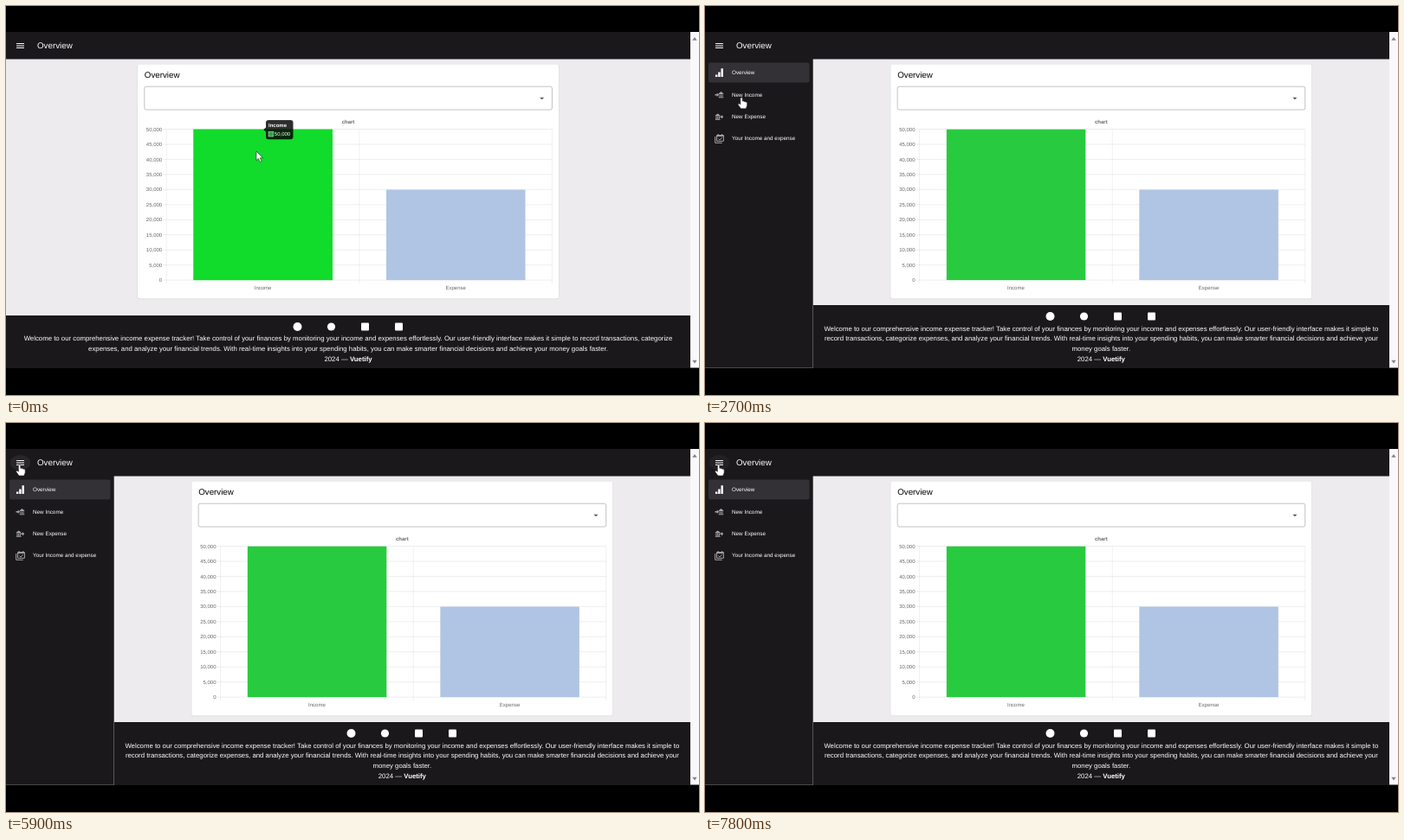
An HTML page for the animation above (8 s loop, 800x450 px).

```html
<!DOCTYPE html>
<html lang="en">
<head>
<meta charset="utf-8">
<title>Overview</title>
<style>
html, body { margin: 0; width: 100%; height: 100%; overflow: hidden; background: #000; }
body { font-family: "Liberation Sans", Arial, sans-serif; text-rendering: geometricPrecision; }
#stage { position: absolute; left: 0; top: 0; width: 800px; height: 450px; overflow: hidden; }
#stage > svg { position: absolute; left: 0; top: 0; }
footer {
  position: absolute; right: 10px; bottom: 31.5px; box-sizing: border-box;
  padding: 21.1px 7.8px 4.1px; background: #1a181b; color: #fff;
  font-size: 7.81px; line-height: 11.72px; text-align: center;
}
footer svg { position: absolute; left: 50%; top: 5.5px; margin-left: -70px; }
.heading { font-size: 9.77px; }
.chart { font-size: 6px; fill: #666; }
.nav { font-size: 6.34px; fill: #fff; }
</style>
</head>
<body>
<div id="stage">
<svg width="800" height="450" viewBox="0 0 800 450">
  <rect y="30" width="790" height="388.5" fill="#edebee"/>

  <g id="card">
    <rect x="151.5" y="67.8" width="487" height="271.4" rx="2.5" fill="#d9d7da"/>
    <rect x="152" y="67.8" width="486" height="270.6" rx="2" fill="#fff"/>
    <text class="heading" x="159.8" y="83.3">Overview</text>
    <rect x="159.8" y="93.2" width="470.6" height="26.8" rx="2" fill="none" stroke="#aaa9ab" stroke-width=".7"/>
    <path d="M616.1 105.7h5l-2.5 2.5z" fill="#555"/>
    <g class="chart">
      <text x="395" y="136.1" text-anchor="middle" font-weight="bold">chart</text>
      <g id="grid"></g>
      <rect x="216.5" y="142.7" width="160.5" height="174.4" fill="#28cb3f"/>
      <rect id="barHover" x="216.5" y="142.7" width="160.5" height="174.4" fill="#11db2b"/>
      <rect x="439" y="212.5" width="160.5" height="104.6" fill="#b0c4e4"/>
      <text x="296.6" y="327.7" text-anchor="middle">Income</text>
      <text x="519.2" y="327.7" text-anchor="middle">Expense</text>
      <g id="tooltip" fill="#fff">
        <path d="M303 132h25.500a3 3 0 0 1 3 3v16.200a3 3 0 0 1-3 3h-25.500a3 3 0 0 1-3-3v-5.700l-2.800-2.500 2.800-2.500v-5.500a3 3 0 0 1 3-3z" fill="#000" fill-opacity=".82"/>
        <text x="303" y="139.800" font-weight="bold">Income</text>
        <rect x="303" y="145.200" width="5.800" height="5.800" fill="#28a93f" stroke="#dfe8df" stroke-width=".5"/>
        <text x="309.800" y="150">50,000</text>
      </g>
    </g>
  </g>

  <g id="drawer">
    <rect y="61" width="124.700" height="357.500" fill="#1a181b"/>
    <rect x="4" y="65.400" width="116.500" height="23.200" rx="2" fill="#333135"/>
    <path d="M12 79.600h2.400v2.400H12zM15.200 76.400h2.400V82h-2.400zM18.500 72.200h2.400V82h-2.400z" fill="#fff"/>
    <g fill="#a5a4a6">
      <path d="M11.500 102.100h2.300v-1.500l2.300 2.200-2.300 2.200v-1.500h-2.300z"/>
      <use href="#bank" x="15.700" y="99"/>
      <use href="#bank" x="11.900" y="124.400"/>
      <path d="M17.300 127.500h1.700V126l2.300 2.200-2.300 2.200v-1.500h-1.700z"/>
    </g>
    <path d="M13.600 149.500h7.800v6.800h-7.800zM13.600 150.600h7.800M15.200 148v1.500M19.700 148v1.500M11.700 151v7.300h8M15.500 153.600l1.500 1.400 2.700-2.700" fill="none" stroke="#a5a4a6" stroke-width="1"/>
    <g id="links" class="nav"></g>
  </g>

  <rect y="30" width="790" height="31.500" fill="#1a181b"/>
  <ellipse id="ripple" cx="16.500" cy="45.900" rx="11.700" ry="8.800" fill="#fff"/>
  <path d="M12 43.500h9M12 46h9M12 48.400h9" stroke="#fff" stroke-width="1"/>
  <text class="heading" x="36" y="48.600" fill="#fff">Overview</text>

  <rect x="790" y="30" width="10" height="388.500" fill="#f9f8fb"/>
  <path d="M792.300 39.700h5.400l-2.700-3.700zM792.300 409.800h5.400l-2.700 3.700z" fill="#85848a"/>

  <g id="cursor" fill="#fff" stroke="#222" stroke-width=".6" stroke-linejoin="round">
    <path id="arrow" d="M0 0V10.600l2.400-2.200 1.800 4 1.900-.9-1.800-3.800h3.300z"/>
    <path id="hand" d="M-1.200 1Q0-.9 1.200 1V4.400Q2.500 3.600 3.200 4.900 4.400 4.300 5 5.400 6.600 5 6.600 6.800V9.300L5.200 13H-.6L-3.800 8.500Q-4 6.800-2.500 7.200L-1.200 8.300z"/>
  </g>

  <defs>
    <path id="bank" d="M0 2.200 2.800 0 5.600 2.200V3H0zM.6 3.500h1v2.300h-1zM2.300 3.500h1v2.300h-1zM4 3.500h1v2.300H4zM0 6.200h5.600v1.100H0z"/>
  </defs>
</svg>

<footer id="footer">
  <svg width="140" height="14" fill="#fff">
    <circle cx="11.500" cy="7" r="5"/>
    <circle cx="50.500" cy="7" r="4.600"/>
    <rect x="85" y="2.500" width="9" height="9" rx="1"/>
    <rect x="124" y="2.500" width="9" height="9" rx="1"/>
  </svg>
  Welcome to our comprehensive income expense tracker! Take control of your finances by monitoring your income and expenses effortlessly. Our user-friendly interface makes it simple to record transactions, categorize expenses, and analyze your financial trends. With real-time insights into your spending habits, you can make smarter financial decisions and achieve your money goals faster.
  <div>2024 — <b>Vuetify</b></div>
</footer>
</div>

<script>
const LOOP = 8000, DRAWER_WIDTH = 124.7, SLIDE = 200;
const el = id => document.getElementById(id);
const clamp = v => Math.min(1, Math.max(0, v));

// Keyframes: time followed by one or more values, joined linearly.
const cursorPath = [
  [100, 289, 168], [900, 66, 77], [1250, 20.5, 48.5], [2250, 20.5, 48.5],
  [2500, 30, 76], [3000, 60, 150], [3400, 240, 100], [3800, 348, 58],
  [4200, 250, 50], [4600, 120, 100], [5000, 75, 198], [5250, 70, 190],
  [5750, 15.6, 48]
];
const rippleAlpha = [
  [1150, 0], [1300, .06], [1600, .06], [1700, .24], [1900, .16], [2200, .05], [2400, 0],
  [5650, 0], [5800, .06], [5900, .06], [6050, .24], [6300, .13], [6600, .05],
  [6800, .06], [6900, .24], [7200, .13], [7600, .04]
];
const barHighlight = [[350, 1], [550, .35], [900, 0]];
const tooltipAlpha = [[350, 1], [650, 0]];
const toggles = [[1720, 1], [5950, -1], [6850, 1]];

function track(keys, t) {
  const next = keys.findIndex(k => k[0] > t);
  if (next === 0) return keys[0].slice(1);
  if (next < 0) return keys[keys.length - 1].slice(1);
  const a = keys[next - 1], b = keys[next], p = (t - a[0]) / (b[0] - a[0]);
  return a.slice(1).map((v, i) => v + (b[i + 1] - v) * p);
}

// cubic-bezier(.4, 0, .2, 1)
function ease(x) {
  let low = 0, high = 1;
  for (let i = 0; i < 20; i++) {
    const s = (low + high) / 2;
    const at = 1.2 * s * (1 - s) ** 2 + .6 * s * s * (1 - s) + s ** 3;
    if (at < x) low = s; else high = s;
  }
  return low * low * (3 - 2 * low);
}

function buildStatic() {
  let grid = "";
  for (let i = 0; i <= 10; i++) {
    const y = 142.5 + i * 17.46;
    const label = ((10 - i) * 5000).toLocaleString("en-US");
    grid += `<path d="M181.2 ${y}H630.5" stroke="#000" stroke-opacity=".1" stroke-width=".7"/>
      <text x="180.2" y="${y + 2.1}" text-anchor="end">${label}</text>`;
  }
  for (const x of [185.2, 407.9, 630.4])
    grid += `<path d="M${x} 142.5V321" stroke="#000" stroke-opacity=".1" stroke-width=".6"/>`;
  el("grid").innerHTML = grid;

  el("links").innerHTML = ["Overview", "New Income", "New Expense", "Your Income and expense"]
    .map((label, i) => `<text x="31" y="${79.2 + i * 25.4}">${label}</text>`).join("");
}

function draw(t) {
  const open = toggles.reduce((sum, [start, dir]) => sum + dir * ease(clamp((t - start) / SLIDE)), 0);
  const edge = open * DRAWER_WIDTH;
  el("drawer").setAttribute("transform", `translate(${edge - DRAWER_WIDTH})`);
  el("card").setAttribute("transform", `translate(${edge / 2})`);
  el("footer").style.left = edge + "px";

  el("barHover").setAttribute("opacity", track(barHighlight, t)[0]);
  el("tooltip").setAttribute("opacity", track(tooltipAlpha, t)[0]);
  el("ripple").setAttribute("opacity", track(rippleAlpha, t)[0]);

  const [x, y] = track(cursorPath, t);
  const onMenu = x < 28 && y < 55;
  const onLink = x > 4 && x < edge - 4 && y > 65 && y < 165;
  const pointing = onMenu || onLink;
  el("cursor").setAttribute("transform", `translate(${x} ${y})`);
  el("hand").setAttribute("opacity", pointing ? 1 : 0);
  el("arrow").setAttribute("opacity", pointing ? 0 : 1);
}

function tick() {
  draw(performance.now() % LOOP);
  requestAnimationFrame(tick);
}

buildStatic();
tick();
</script>
</body>
</html>
```
